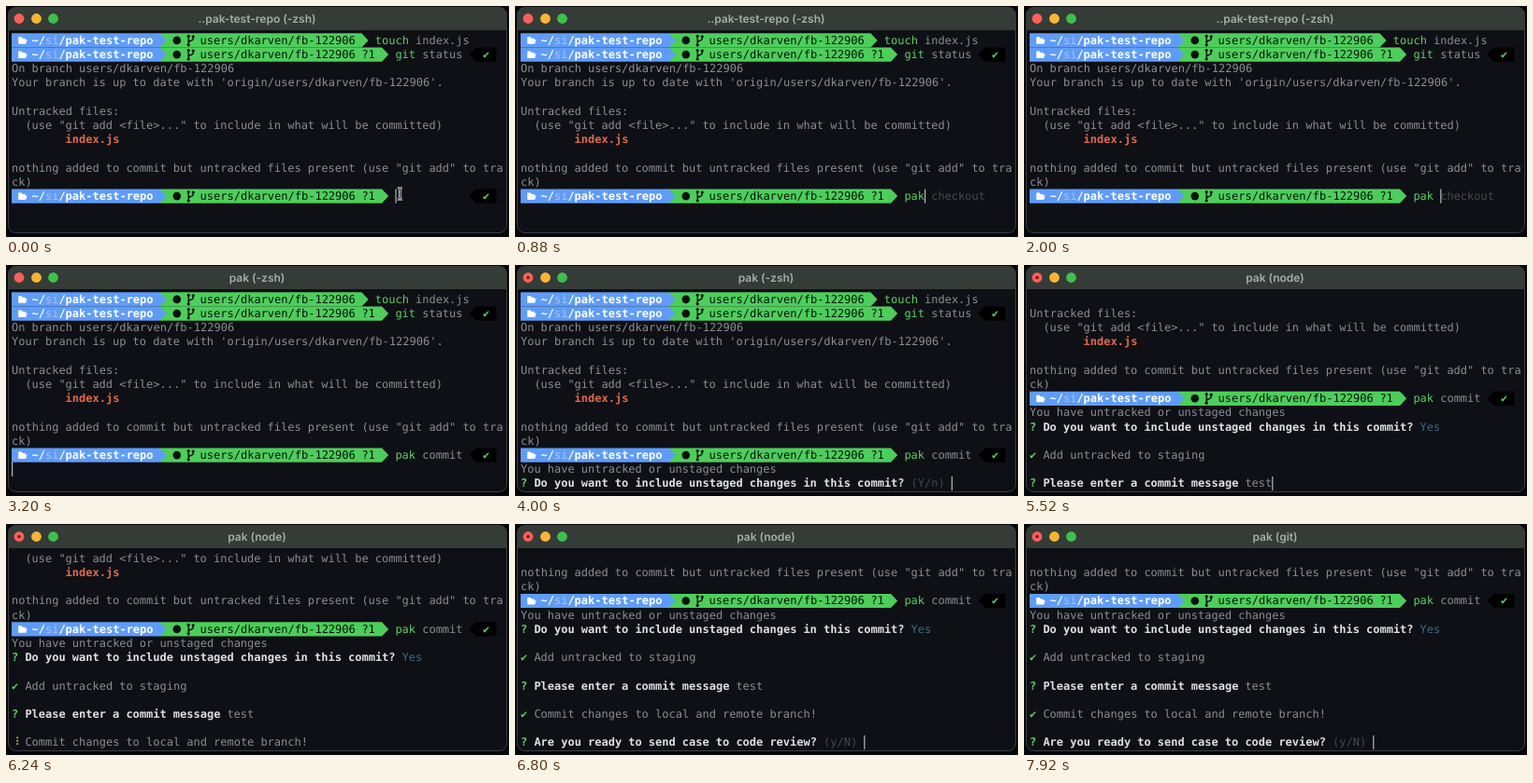
These frames come from a looping animation (538x248 px, 8 s). An HTML page:

```html
<!DOCTYPE html>
<html lang="en">
<head>
<meta charset="utf-8">
<title>Terminal</title>
<style>
html, body { margin: 0; width: 100%; height: 100%; overflow: hidden; background: #06070a; }
svg { display: block; width: 538px; height: 248px; }
text { white-space: pre; text-rendering: geometricPrecision; }
#screen { font: 12px "DejaVu Sans Mono", monospace; fill: #8b8d90; }
#title { font: 600 12px Inter, sans-serif; fill: #a9ada9; text-anchor: middle; }
.green { fill: #5ccf63; }
.red { fill: #e2694a; }
.bold { font-weight: bold; }
.white { fill: #dfe1e3; font-weight: bold; }
.path { fill: #fff; font-weight: bold; }
.faded { fill: #a9c3ee; }
.black { fill: #06120a; }
.dim { fill: #45484c; }
.answer { fill: #3a6a86; }
.spin { fill: #c9b458; }
</style>
</head>
<body>
<svg viewBox="0 0 538 248">
  <rect x="2.5" y="1.5" width="533" height="242" rx="8" fill="#0e1015" stroke="#3b3e42"/>
  <path d="M2 26V9.500a8 8 0 0 1 8-8H528a8 8 0 0 1 8 8V26Z" fill="#353b37"/>
  <circle cx="14" cy="13.500" r="5.400" fill="#f9605a"/>
  <circle id="busy" cx="14" cy="13.500" r="1.700" fill="#7c1512"/>
  <circle cx="32.500" cy="13.500" r="5.400" fill="#f8b535"/>
  <circle cx="50.500" cy="13.500" r="5.400" fill="#3dc04c"/>
  <text id="title" x="268.500" y="17.500"></text>
  <g id="screen"></g>
</svg>
<script>
const LOOP = 8000, LEFT = 6, TOP = 29.3, CW = 7.2, RH = 15.2;
const BLUE = '#5f9cf7', GREEN = '#4dce5b';
const BRANCH = 'users/dkarven/fb-122906';
const screenEl = document.getElementById('screen');
const titleEl = document.getElementById('title');
const busyEl = document.getElementById('busy');

// Each list holds [start time, value] pairs.
const TITLES = [[0, '..pak-test-repo (-zsh)'], [3200, 'pak (-zsh)'], [4960, 'pak (node)'],
  [7520, 'pak (git-remote-https)'], [7760, 'pak (git)']];
const SCROLL = [[0, 0], [4560, 2], [4720, 4], [5920, 6], [6640, 8]];
const TYPED = [[0, 0], [320, 1], [560, 2], [800, 3], [1040, 4],
  [2560, 5], [2640, 6], [2720, 7], [2880, 8], [2960, 9], [3040, 10]];
const CURSOR = [[0, null], [3200, [12, 0]], [3680, [13, 64]], [4560, [15, 0]], [4640, [-1, 0]],
  [4720, [17, 32]], [5520, [17, 36]], [5920, [19, 0]], [6000, [-1, 0]], [6640, [21, 51]]];

const at = (list, t) => list.filter(([start]) => start <= t).pop()[1];

let scroll, out;
const X = col => LEFT + col * CW;
const Y = row => TOP + (row - scroll) * RH;

function put(markup, row) {
  if (row >= scroll) out += markup;
}
function text(row, col, str, cls = '') {
  const safe = str.replace(/</g, '&lt;');
  // The font's own advance is 7.224, so place each word on the grid.
  for (const { 0: word, index } of safe.matchAll(/\S+/g)) {
    const skip = safe.slice(0, index).replace(/&lt;/g, '<').length;
    put(`<text x="${X(col + skip)}" y="${Y(row) + 11.5}" class="${cls}">${word}</text>`, row);
  }
}
function path(row, col, d, fill, stroke = 'none') {
  put(`<path transform="translate(${X(col)} ${Y(row)})" d="${d}" fill="${fill}" stroke="${stroke}" stroke-width="1.4"/>`, row);
}
// Bar of n cells with a pointed right end one cell wide.
function arrow(row, col, n, fill) {
  path(row, col, `M0 0H${n * CW}l${CW} ${RH / 2}l${-CW} ${RH / 2}H0Z`, fill);
}
function dot(row, col, dx, dy, r, fill) {
  put(`<circle cx="${X(col) + dx}" cy="${Y(row) + dy}" r="${r}" fill="${fill}"/>`, row);
}

function prompt(row, dirty) {
  const end = dirty ? 55 : 52;
  arrow(row, 22, end - 22, GREEN);
  arrow(row, 0, 22, BLUE);
  path(row, 1, 'M0 4H3.500l1 1.500H7.500V7H9.500L8 11.500H0Z', '#fff');
  text(row, 3, '~/', 'path');
  text(row, 5, 'si', 'faded');
  text(row, 7, '/pak-test-repo', 'path');
  dot(row, 24, 4, 7.6, 4.3, '#06120a');
  path(row, 26, 'M2 3V13M7 4V5.500Q7 7.500 4.500 8Q2 8.500 2 10.500', 'none', '#06120a');
  [[2, 3], [7, 3.5], [2, 12.5]].forEach(([x, y]) => dot(row, 26, x, y, 1.6, '#06120a'));
  text(row, 28, BRANCH + (dirty ? ' ?1' : ''), 'black');
}
function status(row) {
  path(row, 68, `M0 ${RH / 2}L${CW} 0H${4 * CW}V${RH}H${CW}Z`, '#000');
  text(row, 70, '✔', 'green');
}

function commandLine(t) {
  const typed = 'pak commit'.slice(0, at(TYPED, t));
  const n = typed.length;
  const full = n === 0 ? '' : n < 6 ? 'pak checkout' : 'pak commit';
  prompt(11, true);
  text(11, 57, typed.slice(0, 3), n < 3 ? 'red' : 'green');
  text(11, 61, typed.slice(4));
  text(11, 57 + n, full.slice(n), 'dim');
  if (57 + full.length < 68) status(11);
  return [11, 57 + n];
}
function question(row, str) {
  text(row, 0, '?', 'green bold');
  text(row, 2, str, 'white');
}
function task(row, str, t, start, done) {
  if (t < start) return;
  const frame = '⠋⠙⠹⠸⠼⠴⠦⠧⠇⠏'[Math.floor((t - start) / 80) % 10];
  text(row, 0, t < done ? frame : '✔', t < done ? 'spin' : 'green');
  text(row, 2, str);
}

function draw(t) {
  scroll = at(SCROLL, t);
  out = '';
  prompt(0, false);
  text(0, 54, 'touch', 'green');
  text(0, 60, 'index.js');
  prompt(1, true);
  text(1, 57, 'git', 'green');
  text(1, 61, 'status');
  status(1);
  text(2, 0, 'On branch ' + BRANCH);
  text(3, 0, `Your branch is up to date with 'origin/${BRANCH}'.`);
  text(5, 0, 'Untracked files:');
  text(6, 2, '(use "git add <file>..." to include in what will be committed)');
  text(7, 8, 'index.js', 'red bold');
  text(9, 0, 'nothing added to commit but untracked files present (use "git add" to tra');
  text(10, 0, 'ck)');
  const typing = commandLine(t);

  if (t >= 3680) {
    text(12, 0, 'You have untracked or unstaged changes');
    question(13, 'Do you want to include unstaged changes in this commit?');
    if (t < 4560) text(13, 58, '(Y/n)', 'dim');
    else text(13, 58, 'Yes', 'answer');
  }
  task(15, 'Add untracked to staging', t, 4640, 4720);
  if (t >= 4720) question(17, 'Please enter a commit message');
  if (t >= 5520) text(17, 32, 'test');
  task(19, 'Commit changes to local and remote branch!', t, 6000, 6640);
  if (t >= 6640) {
    question(21, 'Are you ready to send case to code review?');
    text(21, 45, '(y/N)', 'dim');
  }

  const [row, col] = at(CURSOR, t) || typing;
  path(row, col, `M0 0H1.200V${RH}H0Z`, '#b4b7ba');
  if (t < 160) {
    const beam = 'M1 0Q3.500 0 3.500 2V10Q3.500 12 1 12M6 0Q3.500 0 3.500 2M3.500 10Q3.500 12 6 12';
    out += `<g transform="translate(417.800 195.500)" fill="none"><path d="${beam}" stroke="#fff" stroke-width="2.600"/><path d="${beam}" stroke="#111" stroke-width="1"/></g>`;
  }
  screenEl.innerHTML = out;
  titleEl.textContent = at(TITLES, t);
  busyEl.style.display = t >= 3920 ? '' : 'none';
}

let last = -1;
function tick(now) {
  const t = Math.floor(now % LOOP / 80) * 80;
  if (t !== last) draw(last = t);
  requestAnimationFrame(tick);
}
draw(0);
requestAnimationFrame(tick);
</script>
</body>
</html>
```
